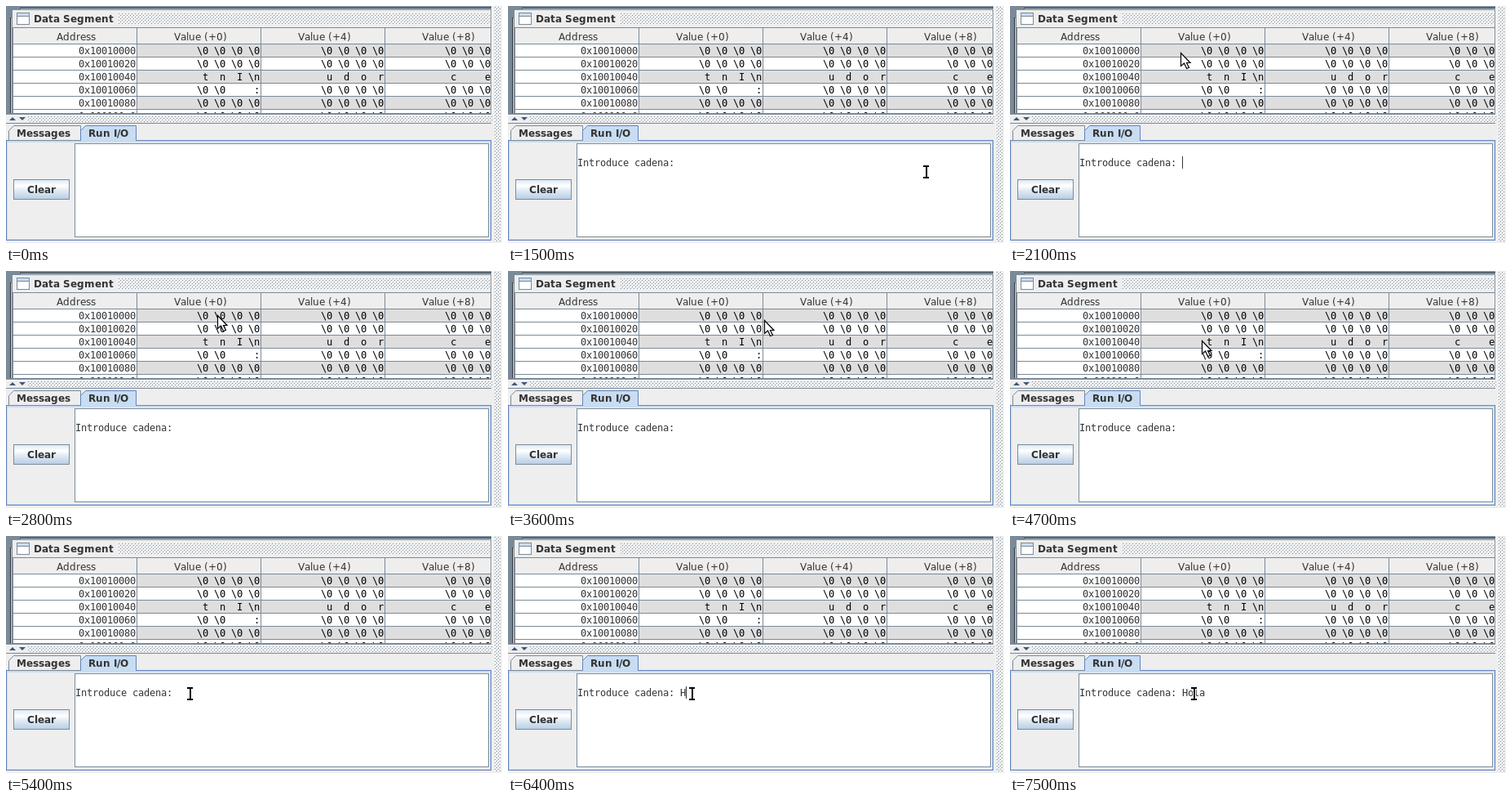
An HTML page with a canvas for the animation above (8 s loop, 608 by 290 pixels).

```html
<!DOCTYPE html>
<html lang="es">
<head>
<meta charset="utf-8">
<style>
  html, body { margin: 0; width: 100%; height: 100%; overflow: hidden; background: #eee; }
  canvas { display: block; }
</style>
</head>
<body>
<canvas id="stage" width="608" height="290"></canvas>
<script>
const ctx = document.getElementById('stage').getContext('2d');
const LOOP = 8000;
const PANEL = '#eeeeee', EDGE = '#7a8a99', BLUE = '#6382bf', PALE = '#c8ddf2', INK = '#333333';
const BOLD = 'bold 12px "DejaVu Sans", sans-serif';
const PLAIN = '12px "DejaVu Sans", sans-serif';
const MONO = '12px "DejaVu Sans Mono", monospace';

// Pointer strokes: start, end, target position, ease-out power
const ENTRY = { x: 512, y: 203, time: 1500 };
const STROKES = [
  { from: 1500, to: 2200, x: 203, y: 54, power: 2 },
  { from: 2550, to: 3400, x: 314, y: 54, power: 2 },
  { from: 3500, to: 3600, x: 314, y: 60, power: 1 },
  { from: 3600, to: 4500, x: 236, y: 68, power: 1 },
  { from: 4600, to: 4700, x: 235, y: 85, power: 1 },
  { from: 4700, to: 5100, x: 225, y: 193, power: 1 }
];
const WORD = 'Hola';
const KEY_TIMES = [6400, 6600, 6800, 6900];

function fill(color, x, y, w, h) {
  ctx.fillStyle = color;
  ctx.fillRect(x, y, w, h);
}

function box(x, y, w, h, face, edge = EDGE) {
  fill(edge, x, y, w, h);
  fill(face, x + 1, y + 1, w - 2, h - 2);
}

function shape(points, face, edge, width = 1) {
  ctx.beginPath();
  points.forEach(([x, y]) => ctx.lineTo(x, y));
  ctx.closePath();
  ctx.fillStyle = face;
  ctx.fill();
  if (!edge) return;
  ctx.strokeStyle = edge;
  ctx.lineWidth = width;
  ctx.stroke();
}

// Glyph advances are rounded to whole pixels, as in hinted desktop text.
const advance = c => Math.round(ctx.measureText(c).width);

function write(text, x, y, font, color = INK) {
  ctx.font = font;
  ctx.fillStyle = color;
  for (const c of text) {
    ctx.fillText(c, x, y);
    x += advance(c);
  }
  return x;
}

function writeCentered(text, x, y, font) {
  ctx.font = font;
  const width = [...text].reduce((sum, c) => sum + advance(c), 0);
  write(text, Math.floor(x - width / 2), y, font);
}

const bumpPattern = (() => {
  const tile = document.createElement('canvas');
  tile.width = tile.height = 4;
  const g = tile.getContext('2d');
  g.fillStyle = PANEL;
  g.fillRect(0, 0, 4, 4);
  for (let i = 0; i < 4; i++) {
    g.fillStyle = i % 2 ? EDGE : '#fff';
    g.fillRect(i, i, 1, 1);
  }
  return ctx.createPattern(tile, 'repeat');
})();

function bumps(x, y, w, h) {
  ctx.save();
  ctx.translate(x, y);
  fill(bumpPattern, 0, 0, w, h);
  ctx.restore();
}

function drawTable() {
  const zeros = '\\0 \\0 \\0 \\0';
  const words = {
    2: [' t  n  I \\n', ' u  d  o  r', ' c     e   '],
    3: ['\\0 \\0     :']
  };
  ctx.save();
  ctx.beginPath();
  ctx.rect(8, 26, 586, 105);
  ctx.clip();
  fill(PANEL, 8, 26, 586, 20);
  fill('#fff', 8, 46, 586, 85);
  for (let row = 0; row < 6; row++) {
    const top = 47 + row * 16;
    if (row % 2 === 0) fill('#dedede', 161, top, 433, 15);
    write('0x100100' + (row * 32).toString(16).padStart(2, '0'), 89, top + 12, MONO);
    for (let col = 0; col < 3; col++) {
      write(words[row]?.[col] ?? zeros, 234 + col * 152, top + 12, MONO, '#000');
    }
    fill(EDGE, 8, top + 15, 586, 1);
  }
  fill(EDGE, 8, 26, 586, 1);
  fill(EDGE, 8, 46, 586, 1);
  ['Address', 'Value (+0)', 'Value (+4)', 'Value (+8)'].forEach((name, col) => {
    const x = 8 + col * 152;
    fill(EDGE, x, 26, 1, 105);
    writeCentered(name, x + 78.5, 42, PLAIN);
  });
  ctx.restore();
}

function drawUpperPane() {
  fill(EDGE, 0, 0, 595, 133);
  fill(INK, 17, 2, 578, 1);
  fill('#b8cfe5', 18, 3, 577, 1);
  fill(INK, 5, 14, 1, 117);
  fill('#b8cfe5', 6, 15, 1, 116);
  fill(PANEL, 8, 5, 586, 21);
  bumps(137, 8, 457, 15);
  box(13, 8, 16, 15, '#fff');
  fill(PALE, 14, 9, 14, 3);
  fill(EDGE, 14, 12, 14, 1);
  write('Data Segment', 34, 20, BOLD);
  drawTable();
  fill('#fff', 0, 133, 595, 1);
  fill('#fff', 595, 0, 1, 133);
}

function drawLowerPane() {
  bumps(26, 134, 570, 8);
  shape([[4, 140], [8, 136], [12, 140]], '#3f5878');
  shape([[16, 136], [24, 136], [20, 140]], '#3f5878');
  fill(EDGE, 0, 143, 595, 1);

  box(0, 164, 595, 123, PALE, BLUE);
  fill(PANEL, 2, 167, 591, 118);
  const tab = (left, right, face, edge) => shape([
    [left, 164.5], [left, 152.5], [left + 6, 146.5], [right, 146.5], [right, 164.5]
  ], face, edge);
  tab(3.5, 91.5, PANEL, EDGE);
  tab(91.5, 159.5, PALE, BLUE);
  fill(PALE, 92, 164, 67, 1);
  write('Messages', 13, 160, BOLD);
  write('Run I/O', 101, 160, BOLD);
  box(84, 168, 508, 115, '#fff');

  const shine = ctx.createLinearGradient(0, 213, 0, 236);
  shine.addColorStop(0, '#dde8f3');
  shine.addColorStop(.3, '#fff');
  shine.addColorStop(.6, '#dde8f3');
  shine.addColorStop(1, '#b8cfe5');
  box(9, 212, 69, 25, shine);
  writeCentered('Clear', 44, 229, BOLD);
}

function drawArrow(x, y) {
  const outline = [[0, 0], [0, 16], [4, 12.5], [7, 19], [10, 18], [7, 12], [11.5, 12]];
  shape(outline.map(([dx, dy]) => [x + .5 + dx, y + .5 + dy]), '#fff', '#000', 1.2);
}

function drawBeam(x, y) {
  for (const [color, grow] of [['#fff', 1], ['#000', 0]]) {
    const bar = (dx, dy, w, h) =>
      fill(color, x + dx - grow, y + dy - grow, w + 2 * grow, h + 2 * grow);
    bar(-3, -8, 7, 2);
    bar(-3, 6, 7, 2);
    bar(0, -7, 2, 14);
  }
}

function drawPointer(t) {
  if (t < ENTRY.time) return;
  let { x, y } = ENTRY;
  for (const s of STROKES) {
    const k = Math.min(1, Math.max(0, (t - s.from) / (s.to - s.from)));
    const eased = 1 - (1 - k) ** s.power;
    x += (s.x - x) * eased;
    y += (s.y - y) * eased;
  }
  (y > 168 ? drawBeam : drawArrow)(Math.round(x), Math.round(y));
}

function caretVisible(t) {
  if (t < 1500) return true;
  if (t >= 5400) return t >= 6000 && t < 7500;
  return Math.floor((t - 400) / 500) % 2 === 1;
}

function drawConsole(t) {
  if (t < 1000) return;
  const typed = WORD.slice(0, KEY_TIMES.filter(time => t >= time).length);
  const end = write('Introduce cadena: ' + typed, 85, 196, MONO);
  if (caretVisible(t)) fill(INK, end, 184, 1, 15);
}

function draw(now) {
  const t = Math.floor(now % LOOP / 100) * 100;
  fill(PANEL, 0, 0, 608, 290);
  drawUpperPane();
  drawLowerPane();
  bumps(598, 0, 8, 288);
  drawConsole(t);
  drawPointer(t);
}

let start;
function tick(now) {
  start ??= now;
  draw(now - start);
  requestAnimationFrame(tick);
}
requestAnimationFrame(tick);
</script>
</body>
</html>
```
